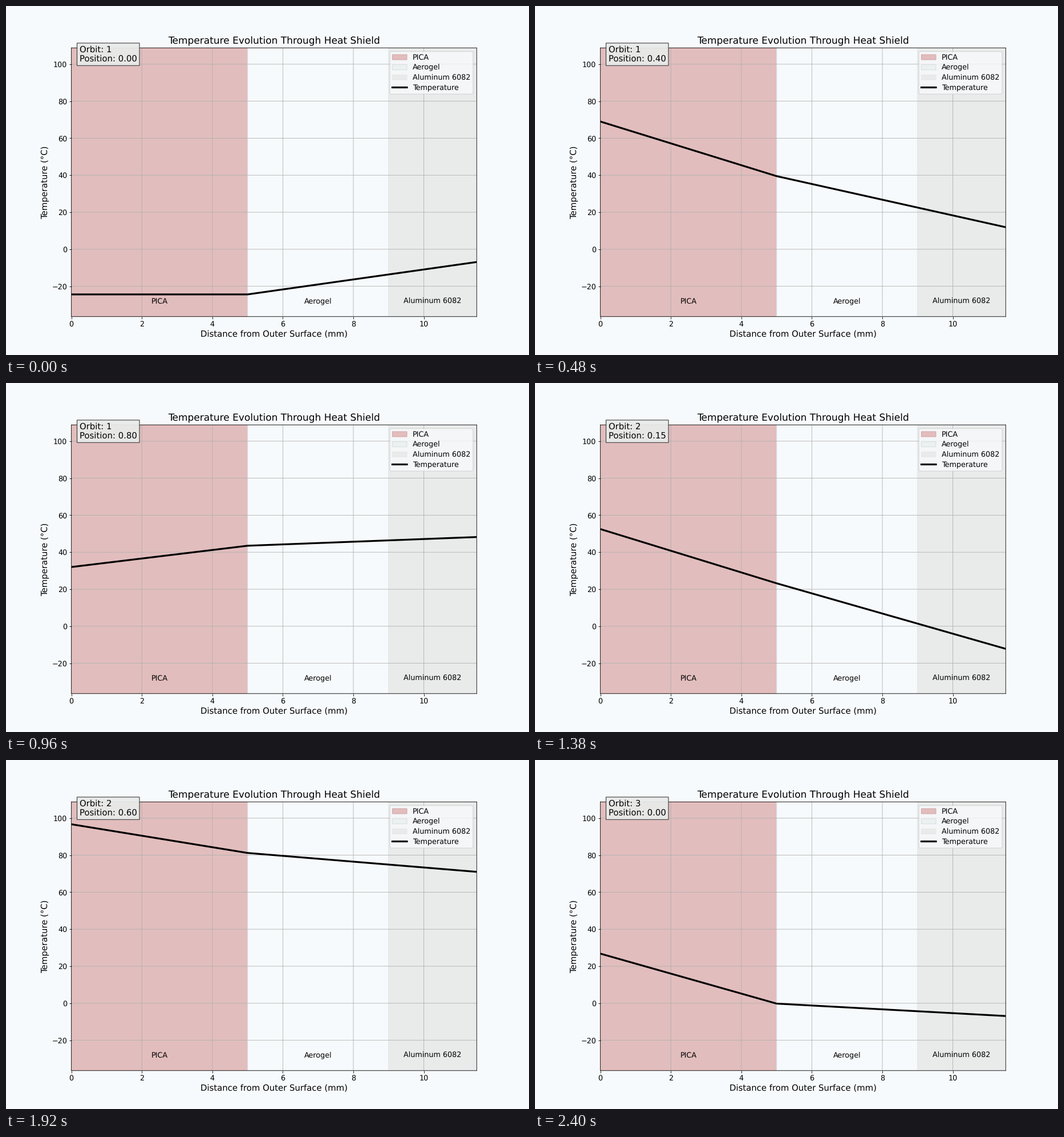
Animation, 917 px wide and 611 px high, one loop 2460 ms. Source, as a matplotlib script:

```python
import numpy as np
import matplotlib.pyplot as plt
from matplotlib.animation import FuncAnimation
from matplotlib.lines import Line2D
from matplotlib.patches import Patch

W, H, DPI = 917, 611, 76.4
FRAMES, INTERVAL = 41, 60
STEPS = 20  # steps per orbit
BACK = "#f7fafc"
DEPTHS = [0, 5, 11.5]
START = [-24.4, -24.4, -6.9]

plt.rcParams.update({
    "figure.facecolor": BACK,
    "axes.facecolor": BACK,
    "text.hinting": "none",
    "path.snap": False,
})

# Key points of one orbit: position, then outer face, interface, inner face
KEYS = np.array([
    (0.00, 26.8, -0.2, -6.9),
    (0.15, 52.5, 23.2, -12.2),
    (0.25, 59.0, 29.5, -17.4),
    (0.40, 69.0, 39.5, 11.9),
    (0.60, 96.7, 81.2, 71.0),
    (0.80, 32.0, 43.5, 48.2),
    (0.95, 5.0, 10.5, 7.5),
])

# name, start, end, face, edge, legend face
LAYERS = [
    ("PICA", 0, 5, "#e2bdbd", "#d6a6a6", "#e2bdbd"),
    ("Aerogel", 5, 9, BACK, "#d9dfe1", "#ebf0f1"),
    ("Aluminum 6082", 9, 11.5, "#e9ebea", "#e6e9e8", "#e9ebea"),
]


def orbit_curve(keys):
    """Periodic monotone cubic through the key points."""
    x, y = keys[:, 0], keys[:, 1:]
    gap = np.diff(x, append=x[0] + 1)
    rise = (np.roll(y, -1, axis=0) - y) / gap[:, None]
    before = np.roll(rise, 1, axis=0)
    # Flat at peaks and dips, harmonic mean of both sides elsewhere
    product = before * rise
    slope = np.where(product > 0, 2 * product / (before + rise), 0)

    def at(p):
        i = np.searchsorted(x, p, side="right") - 1
        j = (i + 1) % len(x)
        t = (p - x[i]) / gap[i]
        ease = t * t * (3 - 2 * t)
        bend = gap[i] * t * (1 - t) * ((1 - t) * slope[i] - t * slope[j])
        return y[i] + (y[j] - y[i]) * ease + bend

    return at


temperature = orbit_curve(KEYS)

# The small excess keeps the pixel size from rounding down
fig, ax = plt.subplots(figsize=((W + 0.01) / DPI, (H + 0.01) / DPI), dpi=DPI)

handles = []
for name, left, right, face, edge, swatch in LAYERS:
    ax.axvspan(left, right, facecolor=face, edgecolor=edge, linewidth=1)
    ax.text((left + right) / 2, -29.4, name, ha="center", fontsize=12)
    handles.append(Patch(facecolor=swatch, edgecolor=edge, label=name))

line, = ax.plot(DEPTHS, START, color="black", linewidth=3)
handles.append(Line2D([], [], color="black", linewidth=3, label="Temperature"))

ax.set_xlim(0, 11.5)
ax.set_ylim(-36.4, 108.8)
ax.set_xlabel("Distance from Outer Surface (mm)", fontsize=14)
ax.set_ylabel("Temperature (°C)", fontsize=14)
ax.set_title("Temperature Evolution Through Heat Shield", fontsize=16)
ax.tick_params(labelsize=12)
ax.grid(True)
ax.legend(handles=handles, loc="upper right", fontsize=12,
          labelspacing=0.4, borderpad=0.35)

status = ax.text(0.02, 0.95, "", transform=ax.transAxes, fontsize=14,
                 linespacing=1.15,
                 bbox=dict(facecolor=(0.91, 0.922, 0.914, 0.95),
                           edgecolor="#333333"))


def update(i):
    orbit, step = divmod(i, STEPS)
    position = step / STEPS
    line.set_ydata(START if i == 0 else temperature(position))
    status.set_text(f"Orbit: {orbit + 1}\nPosition: {position:.2f}")
    return line, status


anim = FuncAnimation(fig, update, frames=FRAMES, interval=INTERVAL,
                     repeat=True, repeat_delay=0)
plt.show()
```
